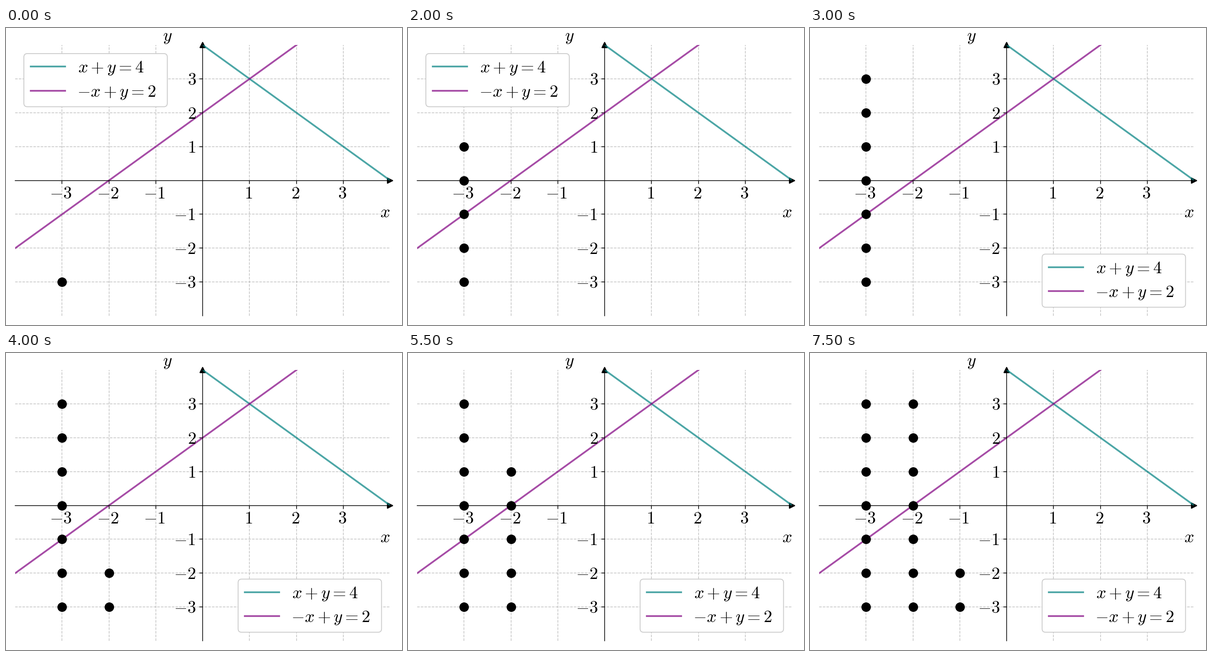
A matplotlib script for the animation above (8 s loop, 864 by 648 pixels).

```python
import matplotlib.pyplot as plt
import numpy as np
from matplotlib.animation import FuncAnimation
from matplotlib.patches import FancyBboxPatch

plt.rcParams["mathtext.fontset"] = "cm"

W, H, DPI = 864, 648, 135
LEFT, RIGHT, TOP, BOTTOM = 20.25, 838.1, 37.1, 628
FRAMES, STEP_MS = 16, 500
SIDE = 7             # lattice points per column
LEGEND_MOVE = 6      # step at which the legend changes corner
EM = 37.5            # 20 pt text in pixels
TICKS = [-3, -2, -1, 1, 2, 3]
LINES = [("$x+y=4$", "teal", lambda x: 4 - x),
         ("$-x+y=2$", "purple", lambda x: 2 + x)]

fig = plt.figure(figsize=(W / DPI, H / DPI), dpi=DPI, facecolor="white")
ax = fig.add_axes([LEFT / W, 1 - BOTTOM / H, (RIGHT - LEFT) / W, (BOTTOM - TOP) / H])
ax.set(xlim=(-4, 4), ylim=(-4, 4), xticks=TICKS, yticks=TICKS)
ax.tick_params(labelbottom=False, labelleft=False)
ax.grid(linestyle="--", alpha=0.75)
for side in ("left", "bottom"):
    ax.spines[side].set_position("zero")
for side in ("right", "top"):
    ax.spines[side].set_visible(False)

ax.plot(4, 0, ">k", clip_on=False)
ax.plot(0, 4, "^k", clip_on=False)
xs = np.array([-4.0, 4.0])
for _, color, line in LINES:
    ax.plot(xs, line(xs), color=color, lw=2, alpha=0.7)
dots, = ax.plot([], [], "ko", ms=10, zorder=3)

# Overlay in pixel coordinates, y downwards
page = fig.add_axes([0, 0, 1, 1])
page.set(xlim=(0, W), ylim=(H, 0))
page.axis("off")


def label(tex, x, y, **kw):
    """Place a formula so that its ink starts at x, with its baseline at y."""
    first = tex[1]
    bearing = 4 if first == "-" else 3 if first.isdigit() else 2
    return page.text(x - bearing, y, tex, fontsize=20, ha="left", va="baseline", **kw)


def legend(x, y):
    """Legend box with its top left corner at (x, y)."""
    box = FancyBboxPatch((x, y), 312.9, 115.9, boxstyle=f"round,pad=0,rounding_size={0.2 * EM}",
                         fc="white", ec="0.8", lw=1, zorder=4)
    parts = [page.add_patch(box)]
    for row, (tex, color, _) in enumerate(LINES):
        base = y + 41.6 + 52.2 * row
        x0 = x + 0.4 * EM
        parts += page.plot([x0, x0 + 2 * EM], [base - 0.35 * EM] * 2,
                           color=color, lw=2, alpha=0.7, zorder=5)
        parts.append(label(tex, x0 + 2.8 * EM, base, zorder=5))
    return parts


cx, cy = (LEFT + RIGHT) / 2, (TOP + BOTTOM) / 2
ux, uy = (RIGHT - LEFT) / 8, (BOTTOM - TOP) / 8
for t in TICKS:
    width = 46.4 if t < 0 else 17.2
    label(f"${t}$", cx + t * ux - width / 2, cy + 39.2)
    label(f"${t}$", cx - 13.1 - width, cy - t * uy + 13)
label("$x$", 817.6, 412.6)
label("$y$", 344, 28)

upper = legend(LEFT + EM / 2, TOP + EM / 2)
lower = legend(RIGHT - EM / 2 - 312.9, BOTTOM - EM / 2 - 115.9)


def update(i):
    k = np.arange(i + 1)
    dots.set_data(k // SIDE - 3, k % SIDE - 3)
    for part in upper:
        part.set_visible(i < LEGEND_MOVE)
    for part in lower:
        part.set_visible(i >= LEGEND_MOVE)
    return [dots, *upper, *lower]


anim = FuncAnimation(fig, update, frames=FRAMES, interval=STEP_MS, repeat=True, repeat_delay=0)
plt.show()
```
